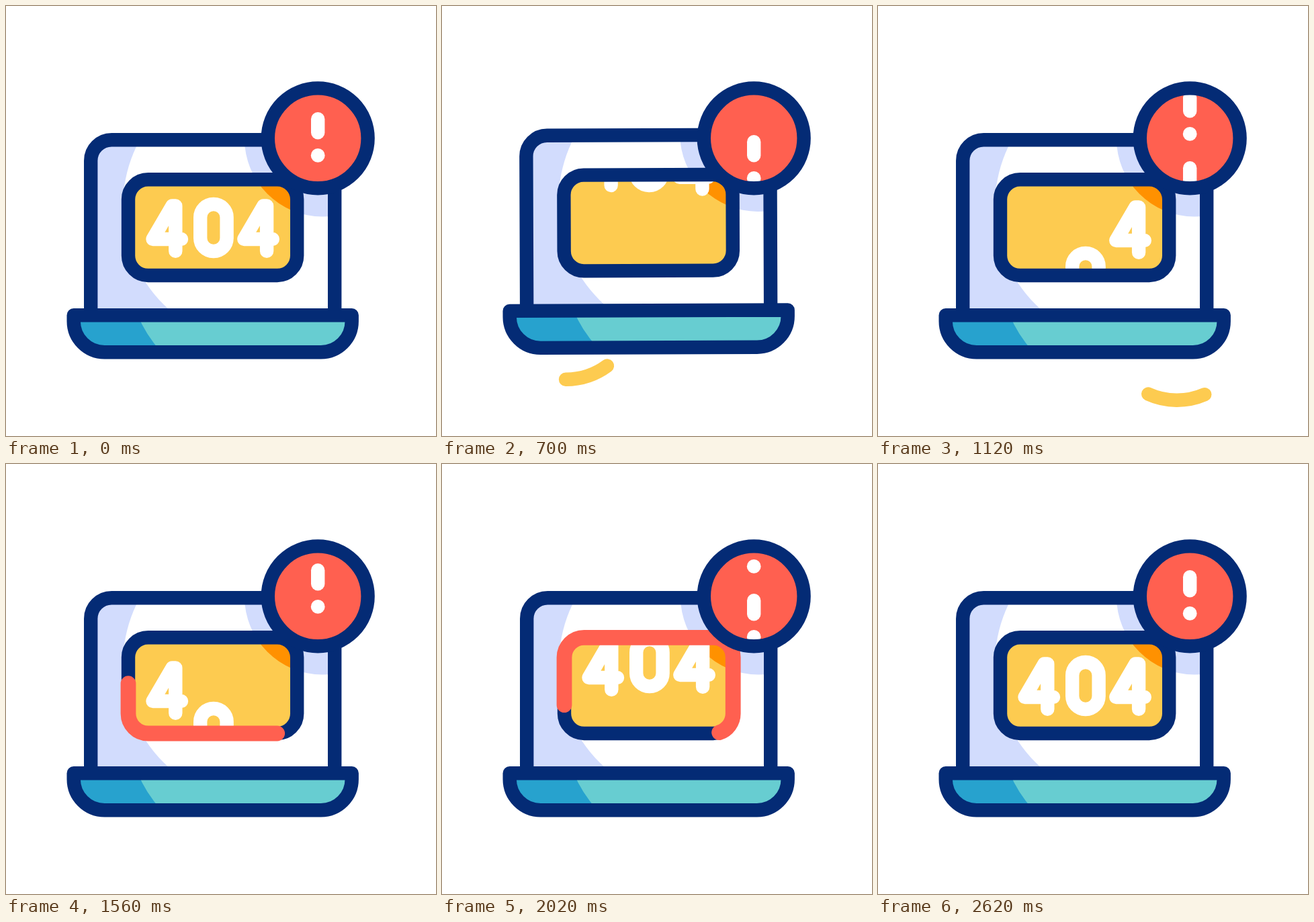
An HTML page with a canvas for the animation above (2.76 s loop, 640 by 640 pixels).

```html
<!DOCTYPE html>
<html lang="en">
<head>
<meta charset="utf-8">
<title>404 laptop</title>
<style>
  html, body { margin: 0; width: 100%; height: 100%; overflow: hidden; background: #fff; }
  canvas { display: block; width: 100vmin; height: 100vmin; }
</style>
</head>
<body>
<canvas id="stage" width="640" height="640"></canvas>
<script>
const ctx = document.getElementById('stage').getContext('2d');
const LOOP = 2760, STEP = 20, LINE = 20.4;
const NAVY = '#042b75', RED = '#ff6050', YELLOW = '#fdcb50', ORANGE = '#ff9100',
      PALE = '#d2dcfd', TEAL = '#67cdd1', BLUE = '#27a2ce', WHITE = '#fff';
const BOX = { x: 182, y: 258.3, w: 251.2, h: 142.7, r: 29.5 };
const BOX_LENGTH = 2 * (BOX.w + BOX.h) - 8 * BOX.r + 2 * Math.PI * BOX.r;
const DIGIT_PERIOD = 220;

// Scroll distances over time as [ms, px]
const DIGIT_SCROLL = [
  [[200, 0], [440, 82], [700, 311], [1120, 550], [1560, 654], [2020, 689], [2520, 880]],
  [[300, 0], [440, 11], [700, 91], [1120, 147], [1560, 371], [2020, 474], [2560, 660]],
  [[380, 0], [440, 2], [700, 85], [1120, 218], [1560, 330], [2020, 473], [2600, 660]]
];
const MARK_SCROLL = [[200, 0], [440, 80], [700, 281], [1120, 347], [1560, 430], [2020, 700], [2500, 735]];
const LIFT = [[200, 0], [440, -6.5], [700, -7], [1040, 0]];
const TILT = [[200, 0], [440, -0.9], [700, -0.2], [880, 0.8], [1080, 0]];

const ease = (t, start, duration) => {
  const x = Math.min(1, Math.max(0, (t - start) / duration));
  return x * x * (3 - 2 * x);
};

// Smooth interpolation that never overshoots its keys
function track(keys, t) {
  const last = keys.length - 1;
  if (t <= keys[0][0]) return keys[0][1];
  if (t >= keys[last][0]) return keys[last][1];
  const slope = i => (keys[i + 1][1] - keys[i][1]) / (keys[i + 1][0] - keys[i][0]);
  const tangent = i => {
    if (i === 0 || i === last) return 0;
    const a = slope(i - 1), b = slope(i);
    return a * b > 0 ? 2 * a * b / (a + b) : 0;
  };
  const i = keys.findIndex(k => k[0] > t) - 1;
  const span = keys[i + 1][0] - keys[i][0], x = (t - keys[i][0]) / span;
  const blend = x * x * (3 - 2 * x);
  return keys[i][1] * (1 - blend) + keys[i + 1][1] * blend
    + span * x * (1 - x) * (tangent(i) * (1 - x) - tangent(i + 1) * x);
}

function group(draw) {
  ctx.save();
  draw();
  ctx.restore();
}

function stroke(color, width = LINE) {
  ctx.strokeStyle = color;
  ctx.lineWidth = width;
  ctx.stroke();
}

function fill(color) {
  ctx.fillStyle = color;
  ctx.fill();
}

function disc(x, y, r, color) {
  ctx.beginPath();
  ctx.arc(x, y, r, 0, 2 * Math.PI);
  fill(color);
}

function polyline(points) {
  ctx.beginPath();
  points.forEach(([x, y]) => ctx.lineTo(x, y));
}

const badgeShade = color => disc(471, 197.5, 116, color);

// Angles run clockwise on screen, in degrees
function swoosh(x, y, r, from, to, head, tail) {
  if (head <= tail) return;
  const at = p => (from + (to - from) * p) * Math.PI / 180;
  ctx.beginPath();
  ctx.arc(x, y, r, at(tail), at(head), to < from);
  stroke(YELLOW);
}

function screenPath() {
  ctx.beginPath();
  ctx.moveTo(126.2, 460);
  ctx.arcTo(126.2, 199.2, 300, 199.2, 31);
  ctx.arcTo(489.2, 199.2, 489.2, 460, 31);
  ctx.lineTo(489.2, 460);
}

function basePath() {
  ctx.beginPath();
  ctx.moveTo(100.7, 460.2);
  ctx.arcTo(100.7, 515.3, 300, 515.3, 46);
  ctx.arcTo(514.7, 515.3, 514.7, 460.2, 46);
  ctx.lineTo(514.7, 460.2);
  ctx.closePath();
}

// Starts at the right end of the bottom edge and runs clockwise
function boxPath() {
  const { x, y, w, h, r } = BOX;
  ctx.beginPath();
  ctx.moveTo(x + w - r, y + h);
  ctx.arcTo(x, y + h, x, y, r);
  ctx.arcTo(x, y, x + w, y, r);
  ctx.arcTo(x + w, y, x + w, y + h, r);
  ctx.arcTo(x + w, y + h, x, y + h, r);
  ctx.closePath();
}

function drawScreen() {
  screenPath();
  fill(WHITE);
  group(() => {
    ctx.clip();
    ctx.fillStyle = PALE;
    ctx.fillRect(126, 199, 180, 262);
    disc(381, 298, 207, WHITE);
    badgeShade(PALE);
  });
  screenPath();
  stroke(NAVY);
}

function drawBase() {
  basePath();
  fill(TEAL);
  group(() => {
    ctx.clip();
    ctx.beginPath();
    ctx.moveTo(90, 455);
    ctx.lineTo(194, 455);
    ctx.quadraticCurveTo(206, 487, 231, 515);
    ctx.lineTo(90, 520);
    fill(BLUE);
  });
  basePath();
  stroke(NAVY);
}

function four(x) {
  polyline([[x + 261, 347], [x + 218.5, 347], [x + 247.5, 297.5], [x + 252.3, 297.5], [x + 252.3, 364.8]]);
  stroke(WHITE);
}

function zero() {
  ctx.beginPath();
  ctx.roundRect(289.2, 295, 39.4, 70, 19.5);
  stroke(WHITE);
}

function drawBox(t) {
  boxPath();
  fill(YELLOW);
  group(() => {
    ctx.clip();
    badgeShade(ORANGE);
    [() => four(0), zero, () => four(135.8)].forEach((draw, i) => {
      const scroll = track(DIGIT_SCROLL[i], t) % DIGIT_PERIOD;
      group(() => {
        ctx.translate(0, scroll > DIGIT_PERIOD / 2 ? DIGIT_PERIOD - scroll : -scroll);
        draw();
      });
    });
  });
  boxPath();
  stroke(NAVY);

  const head = ease(t, 1180, 900) * BOX_LENGTH, tail = ease(t, 1667, 900) * BOX_LENGTH;
  if (head - tail > 0.1) group(() => {
    ctx.setLineDash([head - tail, 2 * BOX_LENGTH]);
    ctx.lineDashOffset = -tail;
    boxPath();
    stroke(RED, 22.8);
  });
}

function exclamation(y) {
  polyline([[464.2, 168.2 + y], [464.2, 188.4 + y]]);
  stroke(WHITE);
  disc(464.2, 222.4 + y, 10.4, WHITE);
}

function drawBadge(t) {
  disc(464.2, 196.8, 74, RED);
  group(() => {
    ctx.clip();
    const scroll = track(MARK_SCROLL, t);
    for (let y = 0; y < 900; y += 315) {
      exclamation(y - scroll);
      exclamation(y + 105 - scroll);
    }
  });
  ctx.beginPath();
  ctx.arc(464.2, 196.8, 74.4, 0, 2 * Math.PI);
  stroke(NAVY);
}

function render(t) {
  ctx.fillStyle = WHITE;
  ctx.fillRect(0, 0, 640, 640);
  ctx.lineCap = ctx.lineJoin = 'round';
  swoosh(184.5, 452.5, 103.3, 181, 53.5, ease(t, 200, 372), ease(t, 460, 372));
  swoosh(445, 483.5, 103.3, 0, 114.5, ease(t, 740, 372), ease(t, 914, 372));
  group(() => {
    ctx.translate(308, 470 + track(LIFT, t));
    ctx.rotate(track(TILT, t) * Math.PI / 180);
    ctx.translate(-308, -470);
    drawScreen();
    drawBase();
    drawBox(t);
  });
  drawBadge(t);
}

const begin = performance.now();
function tick() {
  const t = (performance.now() - begin) % LOOP;
  render(Math.floor(t / STEP) * STEP);
  requestAnimationFrame(tick);
}
tick();
</script>
</body>
</html>
```
